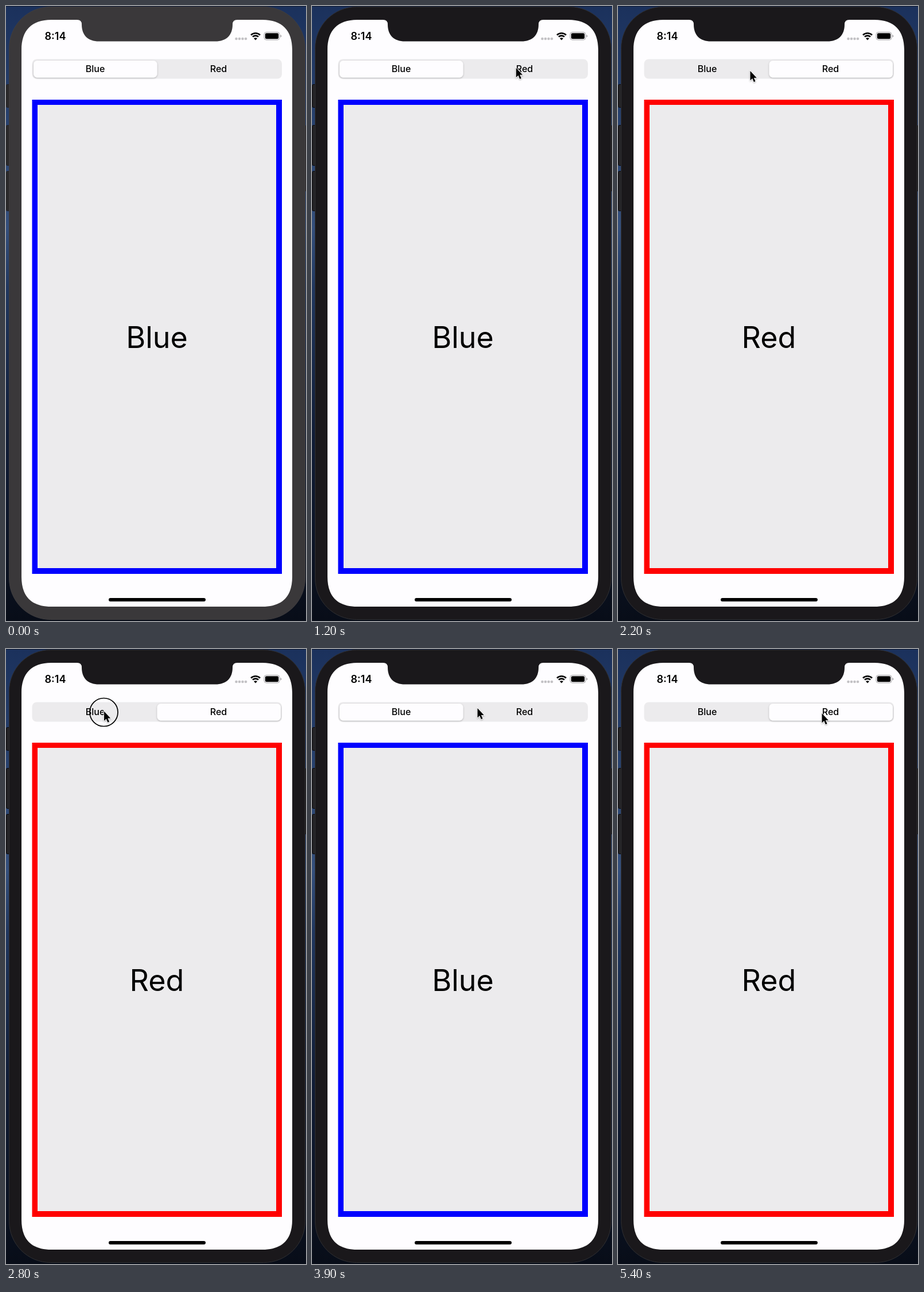
An HTML page for the animation above (5.5 s loop, 523 px wide and 1070 px high).

```html
<!DOCTYPE html>
<html>
<head>
<meta charset="utf-8">
<style>
  html, body { margin: 0; width: 100%; height: 100%; overflow: hidden; background: #0a1224; }
  svg { display: block; width: 523px; height: 1070px; font-family: Inter, Roboto, sans-serif; }
  text { text-anchor: middle; }
</style>
</head>
<body>
<svg viewBox="0 0 523 1070">
  <defs>
    <linearGradient id="sky" x2="0" y2="1">
      <stop offset="0" stop-color="#1b315c"/>
      <stop offset=".2" stop-color="#28426f"/>
      <stop offset=".36" stop-color="#344f7c"/>
      <stop offset=".46" stop-color="#20375f"/>
      <stop offset=".7" stop-color="#101c36"/>
      <stop offset="1" stop-color="#080d18"/>
    </linearGradient>
    <filter id="soft" x="-10%" y="-40%" width="120%" height="190%">
      <feDropShadow dx="0" dy="1" stdDeviation="1.4" flood-opacity=".28"/>
    </filter>
    <filter id="drop" x="-50%" y="-50%" width="200%" height="200%">
      <feDropShadow dx="0" dy="1" stdDeviation="1" flood-opacity=".35"/>
    </filter>
  </defs>

  <rect width="523" height="1070" fill="url(#sky)"/>
  <rect width="523" height="1" fill="#0c1730"/>
  <g id="buttons" stroke-width="1">
    <rect x=".5" y="136.5" width="9" height="40" rx="2"/>
    <rect x=".5" y="207.5" width="9" height="70" rx="2"/>
    <rect x=".5" y="287.5" width="9" height="69" rx="2"/>
    <rect x="516" y="207.5" width="7" height="115" rx="2"/>
  </g>
  <rect id="body" x="5.5" y="1.5" width="516" height="1066" rx="72"/>

  <!-- screen with notch -->
  <path fill="#fefdff" d="M79 24H124Q132 24 132 32C132 51 143 61.500 162 61.500H365C384 61.500 395 51 395 32Q395 24 403 24H447C482 24 499 43 499 76V993C499 1027 482 1045 447 1045H79C44 1045 27 1027 27 993V76C27 43 44 24 79 24Z"/>

  <text x="86" y="58.500" font-size="18" font-weight="600">8:14</text>
  <g fill="#c3c2c5">
    <circle cx="401.500" cy="57" r="2.300"/>
    <circle cx="407" cy="57" r="2.300"/>
    <circle cx="412.500" cy="57" r="2.300"/>
    <circle cx="418" cy="57" r="2.300"/>
  </g>
  <g fill="none" stroke="#000" stroke-width="2.600">
    <path d="M427 50.500A11.500 11.500 0 0 1 443 50.500"/>
    <path d="M430 53.700A7 7 0 0 1 440 53.700"/>
  </g>
  <path d="M432 56.300Q435 54 438 56.300L435 59.400Z"/>
  <rect x="450" y="45.500" width="27" height="13.500" rx="4" fill="none" stroke="#a3a2a5"/>
  <rect x="451.800" y="47.200" width="23.400" height="10.100" rx="2.400"/>
  <path d="M478.500 50V54.500Q480.200 54 480.200 52.250T478.500 50Z" fill="#a3a2a5"/>

  <rect x="45.500" y="92.500" width="435.500" height="34" rx="8" fill="#ecebed"/>
  <rect id="thumb" y="95" width="215.500" height="29.500" rx="6.500" fill="#fefdff" filter="url(#soft)"/>
  <g font-size="16" font-weight="500">
    <text x="155.500" y="115.300">Blue</text>
    <text x="370.500" y="115.300">Red</text>
  </g>

  <rect id="frame" x="45.500" y="163" width="435.500" height="825"/>
  <rect x="55" y="172" width="416" height="806" fill="#ecebed"/>
  <text id="label" x="263" y="595" font-size="52"></text>
  <rect x="179" y="1030" width="169" height="6" rx="3"/>

  <g id="pointer">
    <circle id="ring" cy="1.500" r="24.500" fill="none" stroke="#000" stroke-width="1.700"/>
    <path d="M.5 0V16.500L4.200 13L6.900 19.200L9.600 18L6.900 12H11.800Z" stroke="#fff" stroke-width="1.600" paint-order="stroke" filter="url(#drop)"/>
  </g>
</svg>
<script>
const $ = id => document.getElementById(id);
const LOOP = 5500, STEP = 100;

// time, x, y of the pointer tip
const path = [
  [100, 266, 232], [200, 183, 175], [300, 183, 175], [500, 245, 150],
  [700, 325, 120], [900, 355, 108], [1800, 356, 107.5], [1900, 352, 108],
  [2200, 230, 113], [2500, 177, 110], [2700, 170.500, 108.500], [3600, 170.500, 108.500],
  [3900, 288, 103], [4200, 350, 111], [4300, 355, 112], [LOOP, 355, 112]
];
const presses = [[1000, 1200], [1300, 1450], [2800, 2960], [4500, 4680]];
const releases = [1450, 2960, 4680];

const within = (t, [from, to]) => t >= from && t < to;

function pointerAt(t) {
  const i = Math.max(1, path.findIndex(p => p[0] > t));
  const [a, b] = [path[i - 1], path[i]];
  const u = (t - a[0]) / (b[0] - a[0]);
  return [a[1] + (b[1] - a[1]) * u, a[2] + (b[2] - a[2]) * u];
}

// 0 is Blue, 1 is Red; each release slides to the other side
function slide(t) {
  const moved = start => {
    const u = Math.min(1, Math.max(0, (t - start) / 160));
    return 1 - (1 - u) ** 3;
  };
  return moved(releases[0]) - moved(releases[1]) + moved(releases[2]);
}

function draw(t) {
  const active = t >= 1200;
  const red = releases.filter(r => t >= r + 200).length % 2 === 1;

  $("body").setAttribute("fill", active ? "#1a181b" : "#3a383a");
  $("body").setAttribute("stroke", active ? "#303033" : "#403e40");
  $("buttons").setAttribute("fill", active ? "#232225" : "#2a292b");
  $("buttons").setAttribute("stroke", active ? "#09090b" : "#242326");

  $("thumb").setAttribute("x", 48 + 215.5 * slide(t));
  $("frame").setAttribute("fill", red ? "#f00" : "#00f");
  $("label").textContent = red ? "Red" : "Blue";

  $("pointer").style.display = t < 100 ? "none" : "";
  if (t >= 100) $("pointer").setAttribute("transform", `translate(${pointerAt(t)})`);
  $("ring").style.display = presses.some(p => within(t, p)) ? "" : "none";
}

const began = performance.now();
function tick() {
  const t = (performance.now() - began) % LOOP;
  draw(Math.floor(t / STEP) * STEP);
  requestAnimationFrame(tick);
}
tick();
</script>
</body>
</html>
```
